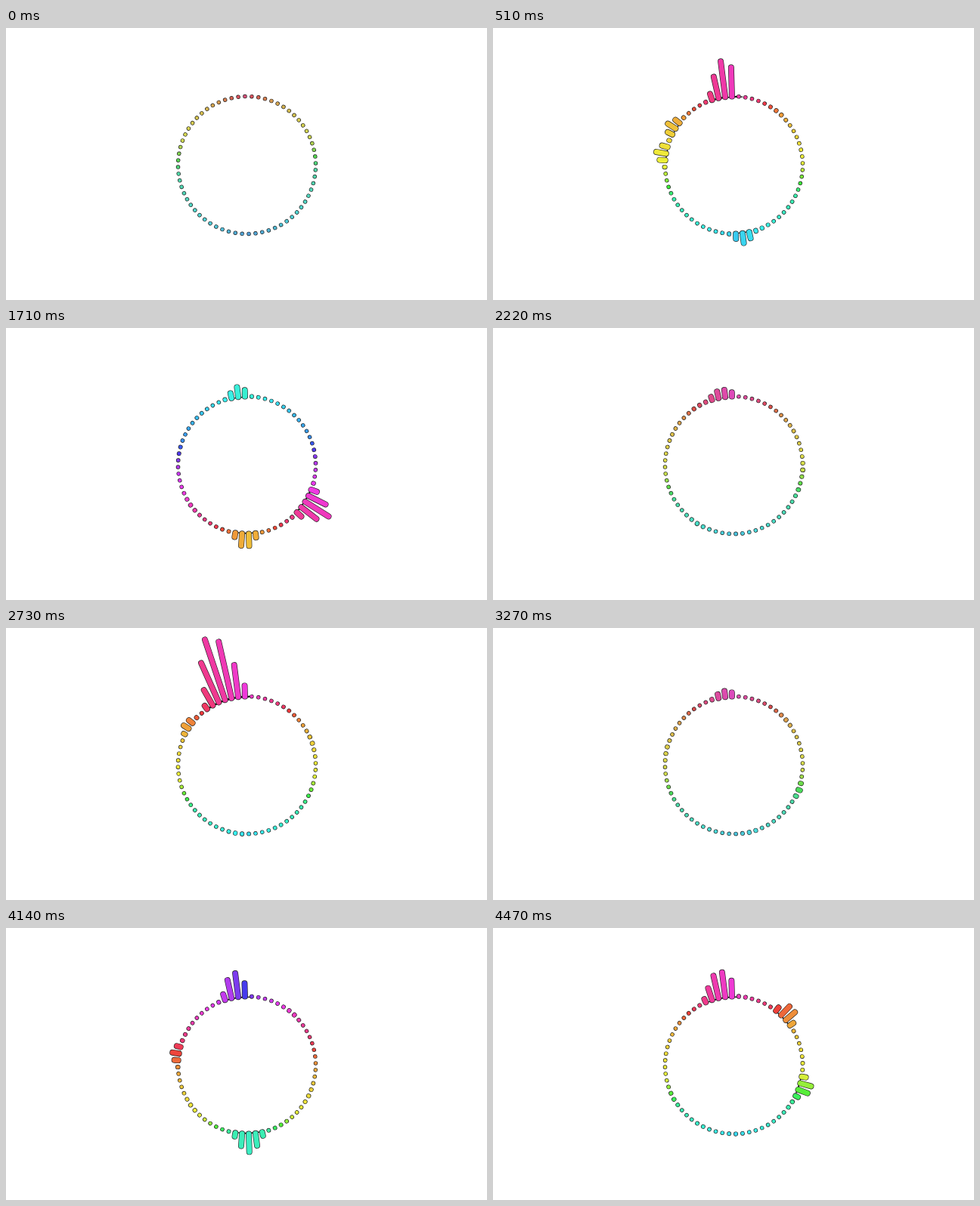
These frames come from a looping animation (636 px wide and 360 px high, 4.5 s). An HTML page with a canvas:

```html
<!DOCTYPE html>
<html>
<head>
<meta charset="utf-8">
<style>
  html, body { margin: 0; width: 100%; height: 100%; overflow: hidden; background: #fff; }
  canvas { display: block; }
</style>
</head>
<body>
<canvas id="stage" width="636" height="360"></canvas>
<script>
const ctx = document.getElementById('stage').getContext('2d');
const LOOP = 4500, STEP = 30, COUNT = 64, RADIUS = 91;
const TURN = 2 * Math.PI / COUNT, TILT = 0.028;

// Each hit: time in ms, centre bar, height
const HITS = [
  [240, 1.3, 82], [270, 13, 28],
  [510, 0.8, 49], [510, 10, 13], [510, 14, 14], [510, 33.1, 14],
  [780, 32, 22], [840, 45, 17], [810, 0.9, 34],
  [1140, 0.7, 72], [1140, 14, 15], [1140, 4, 9],
  [1410, 13.5, 18], [1470, 43, 24], [1440, 1.5, 40],
  [1740, 42, 45], [1710, 0.9, 14], [1710, 31.5, 19],
  [2010, 1.4, 73],
  [2340, 44, 29], [2430, 2, 57],
  [2730, 2.7, 87], [2730, 9.7, 9],
  [3060, 44, 26], [3090, 1, 45],
  [3420, 1.2, 72],
  [3780, 0.7, 23], [3780, 10.8, 30], [3780, 14, 18], [3780, 56.3, 46],
  [4080, 32, 43], [4050, 14, 22], [4140, 1.2, 33],
  [4380, 1.35, 79], [4470, 55.5, 19], [4470, 44.6, 17]
];

// Palette position -> hue; the cycle closes at the last stop
const HUES = [[0, 280], [30, 311], [58, 342], [80, 392], [95, 408],
  [128, 425], [153, 518], [182, 532], [245, 570], [267, 640]];
const PERIOD = 267;

const bell = x => Math.exp(-x * x / 2);
const envelope = age => age < 0 ? bell(age / 50) : Math.exp(-age / 110);

function hueAt(position) {
  const p = (position % PERIOD + PERIOD) % PERIOD;
  const k = HUES.findIndex(stop => stop[0] > p);
  const [p0, h0] = HUES[k - 1], [p1, h1] = HUES[k];
  return h0 + (h1 - h0) * (p - p0) / (p1 - p0);
}

// Taller hits spread over more bars
function heightAt(i, t) {
  const ripple = 1.6 * Math.sin(i * 0.45 + t / 400) ** 2 * Math.sin(i * 0.15 - t / 900) ** 2;
  const height = HITS.reduce((top, [time, centre, peak]) =>
    Math.max(top, peak * envelope(t - time) * bell((i - centre) / (0.9 + peak / 160))), ripple);
  return height * Math.min(1, t / 90);
}

// Degrees away from the top of the ring, equal on both sides
const fromTop = i => Math.min(i, COUNT - i) * 360 / COUNT;

function line(x0, y0, x1, y1, width, color) {
  ctx.lineWidth = width;
  ctx.strokeStyle = color;
  ctx.beginPath();
  ctx.moveTo(x0, y0);
  ctx.lineTo(x1, y1);
  ctx.stroke();
}

function place(i) {
  ctx.setTransform(1, 0, 0, 1, 318.5, 181.5);
  ctx.rotate(-TILT - i * TURN);
}

function draw(t) {
  const heights = Array.from({ length: COUNT }, (_, i) => heightAt(i, t));

  // Magenta follows the loudest bars
  let weight = 0, sum = 0;
  heights.forEach((h, i) => { weight += h ** 4; sum += h ** 4 * fromTop(i); });
  const offset = weight > 1 ? 42 - 1.05 * sum / weight : 58;
  const saturation = 62 + 23 * Math.min(1, Math.max(...heights) / 35);

  ctx.setTransform(1, 0, 0, 1, 0, 0);
  ctx.fillStyle = '#fff';
  ctx.fillRect(0, 0, 636, 360);
  ctx.lineCap = 'round';

  heights.forEach((h, i) => {
    if (h < 5) return;
    const reach = Math.min(h * 0.35, 20);
    place(i);
    line(-reach, 1 - RADIUS, reach, 1 - RADIUS, 1.4, '#111');
  });
  heights.forEach((h, i) => {
    const width = 4.2 + Math.min(2.4, h * 0.4);
    const color = `hsl(${hueAt(fromTop(i) + offset)}, ${saturation}%, 58%)`;
    const tip = -RADIUS - Math.max(0.01, h - 1);
    place(i);
    line(0, -RADIUS, 0, tip, width + 1.3, '#222');
    line(0, -RADIUS, 0, tip, width, color);
  });
}

function tick() {
  draw(Math.floor(performance.now() % LOOP / STEP) * STEP);
  requestAnimationFrame(tick);
}
tick();
</script>
</body>
</html>
```
